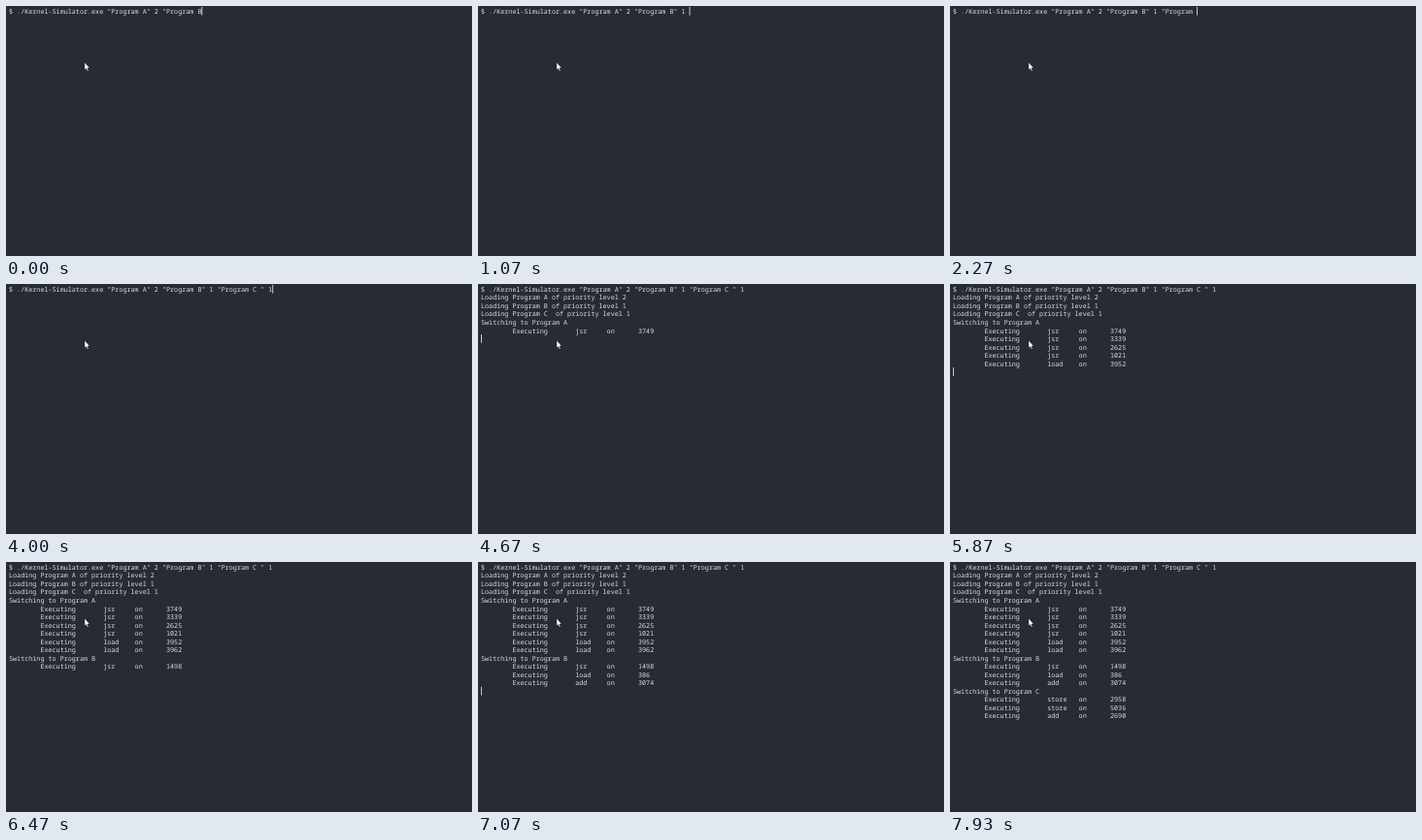
Write an HTML page that moves like this. It is 480 px wide and 258 px high and loops after 8 s.

```html
<!DOCTYPE html>
<html lang="en">
<head>
<meta charset="utf-8">
<title>Kernel simulator</title>
<style>
html, body { margin: 0; width: 100%; height: 100%; overflow: hidden; background: #282a34; }
svg { display: block; width: 480px; height: 258px; }
text {
  font: 6.75px "Noto Sans Mono", "DejaVu Sans Mono", monospace;
  fill: #dcdfe4;
  white-space: pre;
  font-variant-ligatures: none;
  text-rendering: geometricPrecision;
}
</style>
</head>
<body>
<svg id="stage" viewBox="0 0 480 258">
  <rect width="480" height="258" fill="#282a34"/>
  <rect y="257" width="480" height="1" fill="#292233"/>
  <g id="lines"></g>
  <rect id="caret" width="0.8" height="8.7" fill="#f2f2f2"/>
  <path d="M81 58.2 V66.1 L82.7 64.6 L83.9 67.2 L85 66.7 L83.9 64.1 L86.1 63.9 Z"
        fill="#fff" stroke="#15161b" stroke-width="0.4"/>
</svg>
<script>
const LOOP = 8000, LEFT = 3, CHAR = 4.05, ROW = 8.53, BASE = 7.9;
const command = '$ ./Kernel-Simulator.exe "Program A" 2 "Program B" 1 "Program C " 1';

// [time, characters typed]
const typing = [
  [0, 49], [270, 50], [400, 51], [730, 52], [1070, 53], [1600, 61], [2270, 62],
  [2600, 63], [2870, 64], [3400, 65], [3870, 66], [4000, 67]
];
// [time, caret visible]
const blink = [
  [0, 1], [4600, 0], [4670, 1], [5200, 0], [5800, 1], [6330, 0], [6930, 1], [7470, 0]
];

const exec = (op, addr) =>
  ' '.repeat(8) + 'Executing'.padEnd(16) + op.padEnd(8) + 'on'.padEnd(8) + addr;

// [time, output lines printed together]
const output = [
  [4670, 'Loading Program A of priority level 2', 'Loading Program B of priority level 1',
    'Loading Program C  of priority level 1', 'Switching to Program A', exec('jsr', 3749)],
  [4930, exec('jsr', 3339)],
  [5270, exec('jsr', 2625)],
  [5530, exec('jsr', 1021)],
  [5870, exec('load', 3952)],
  [6130, exec('load', 3962)],
  [6470, 'Switching to Program B', exec('jsr', 1498)],
  [6730, exec('load', 386)],
  [7070, exec('add', 3074)],
  [7330, 'Switching to Program C', exec('store', 2958)],
  [7670, exec('store', 5036)],
  [7930, exec('add', 2690)]
];

const group = document.getElementById('lines');
const caret = document.getElementById('caret');
const rows = [];

function addRow(time, str) {
  const el = document.createElementNS('http://www.w3.org/2000/svg', 'text');
  el.setAttribute('x', LEFT);
  el.setAttribute('y', BASE + rows.length * ROW);
  el.textContent = str;
  group.append(el);
  rows.push({ time, el });
}

addRow(0, command);
for (const [time, ...strs] of output) strs.forEach(s => addRow(time, s));

const valueAt = (steps, t) => steps.filter(s => s[0] <= t).pop()[1];

function draw(t) {
  const typed = valueAt(typing, t);
  rows[0].el.textContent = command.slice(0, typed);
  let shown = 0;
  for (const { time, el } of rows) {
    const on = time <= t;
    el.setAttribute('visibility', on ? 'visible' : 'hidden');
    if (on) shown++;
  }
  const atPrompt = shown === 1;
  caret.setAttribute('x', LEFT + (atPrompt ? typed * CHAR : 0));
  caret.setAttribute('y', 0.9 + (atPrompt ? 0 : shown * ROW));
  caret.setAttribute('visibility', valueAt(blink, t) ? 'visible' : 'hidden');
}

function tick() {
  draw(performance.now() % LOOP);
  requestAnimationFrame(tick);
}
tick();
</script>
</body>
</html>
```
